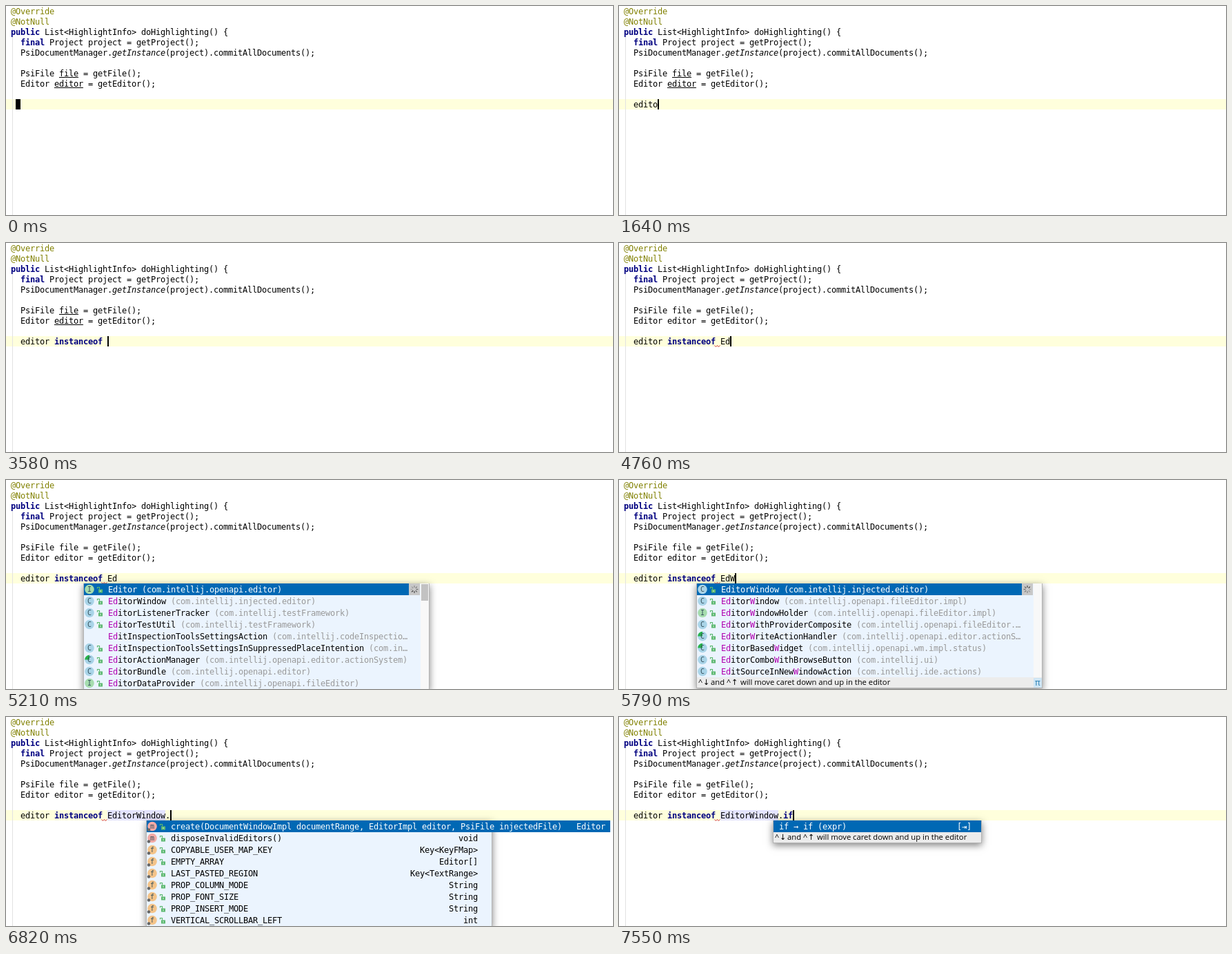
These frames come from a looping animation (880x303 px, 8 s). An HTML page with a canvas:

```html
<!DOCTYPE html>
<html lang="en">
<head>
<meta charset="utf-8">
<title>Code completion</title>
<style>
html, body { margin: 0; width: 880px; height: 303px; overflow: hidden; background: #fff; }
canvas { display: block; }
</style>
</head>
<body>
<canvas id="stage" width="880" height="303"></canvas>
<script>
const ctx = document.getElementById('stage').getContext('2d');
const LOOP = 8000, CELL = 7, LINE = 15, ROW = 17, CARET_Y = 135, POPUP_Y = 150;
const MONO = '"DejaVu Sans Mono", monospace';
const SANS = '"Open Sans", "DejaVu Sans", sans-serif';

const CODE = [
  '@Override',
  '@NotNull',
  'public List<HighlightInfo> doHighlighting() {',
  '  final Project project = getProject();',
  '  PsiDocumentManager.getInstance(project).commitAllDocuments();',
  '',
  '  PsiFile file = getFile();',
  '  Editor editor = getEditor();'
];

// Keystrokes; "<" erases the previous character.
const KEYS = [
  [900, 'e'], [1190, 'd'], [1340, 'i'], [1490, 't'], [1640, 'o'], [1790, 'r'], [2390, ' '],
  [2830, 'i'], [2980, 'n'], [3130, 's'], [3580, 'tanceof '],
  [4470, 'E'], [4760, 'd'], [5790, 'W'], [6230, '<itorWindow'],
  [6530, '.'], [7110, 'i'], [7420, 'f']
];

// Class rows: icon kind, name, package.
const ED_ROWS = [
  ['I', 'Editor', '(com.intellij.openapi.editor)'],
  ['C', 'EditorWindow', '(com.intellij.injected.editor)'],
  ['C', 'EditorListenerTracker', '(com.intellij.testFramework)'],
  ['C', 'EditorTestUtil', '(com.intellij.testFramework)'],
  ['', 'EditInspectionToolsSettingsAction', '(com.intellij.codeInspectio…'],
  ['C', 'EditInspectionToolsSettingsInSuppressedPlaceIntention', '(com.in…'],
  ['A', 'EditorActionManager', '(com.intellij.openapi.editor.actionSystem)'],
  ['C', 'EditorBundle', '(com.intellij.openapi.editor)'],
  ['I', 'EditorDataProvider', '(com.intellij.openapi.fileEditor)']
];
const EDW_ROWS = [
  ['C', 'EditorWindow', '(com.intellij.injected.editor)'],
  ['C', 'EditorWindow', '(com.intellij.openapi.fileEditor.impl)'],
  ['I', 'EditorWindowHolder', '(com.intellij.openapi.fileEditor.impl)'],
  ['C', 'EditorWithProviderComposite', '(com.intellij.openapi.fileEditor.…'],
  ['A', 'EditorWriteActionHandler', '(com.intellij.openapi.editor.actionS…'],
  ['A', 'EditorBasedWidget', '(com.intellij.openapi.wm.impl.status)'],
  ['C', 'EditorComboWithBrowseButton', '(com.intellij.ui)'],
  ['C', 'EditSourceInNewWindowAction', '(com.intellij.ide.actions)']
];
// Member rows: icon kind, name, no package, type.
const MEMBER_ROWS = [
  ['m', 'create(DocumentWindowImpl documentRange, EditorImpl editor, PsiFile injectedFile)', '', 'Editor'],
  ['m', 'disposeInvalidEditors()', '', 'void'],
  ['f', 'COPYABLE_USER_MAP_KEY', '', 'Key<KeyFMap>'],
  ['f', 'EMPTY_ARRAY', '', 'Editor[]'],
  ['f', 'LAST_PASTED_REGION', '', 'Key<TextRange>'],
  ['f', 'PROP_COLUMN_MODE', '', 'String'],
  ['f', 'PROP_FONT_SIZE', '', 'String'],
  ['f', 'PROP_INSERT_MODE', '', 'String'],
  ['f', 'VERTICAL_SCROLLBAR_LEFT', '', 'int']
];
const IF_ROWS = [['', 'if → if (expr)', '', '[⇥]']];
const ICON_COLORS = { C: '#a9d4e8', A: '#a9d4e8', I: '#a5dcae', m: '#f2aaa6', f: '#f4c48a' };

function rect(x, y, w, h, color) {
  ctx.fillStyle = color;
  ctx.fillRect(x, y, w, h);
}

function setFont(font, spacing = 0) {
  ctx.letterSpacing = '0px';
  ctx.font = font;
  ctx.letterSpacing = spacing + 'px';
}

// Monospace text on the seven-pixel grid; returns the x where it ends.
function mono(str, x, y, color = '#000', style = '') {
  setFont(`${style} 12px ${MONO}`);
  ctx.letterSpacing = CELL - ctx.measureText('0').width + 'px';
  ctx.fillStyle = color;
  ctx.fillText(str, x, y);
  return x + str.length * CELL;
}

function stroke(color, width, points) {
  ctx.strokeStyle = color;
  ctx.lineWidth = width;
  ctx.beginPath();
  points.forEach(([x, y]) => ctx.lineTo(x, y));
  ctx.stroke();
}

function codeLine(line, row) {
  let x = CELL;
  for (const part of line.split(/(@\w+|\b(?:public|final|instanceof|if)\b|getInstance)/)) {
    const [color, style] = part[0] === '@' ? ['#808000', '']
      : /^(public|final|instanceof|if)$/.test(part) ? ['#000080', 'bold']
      : ['#000', part === 'getInstance' ? 'italic' : ''];
    x = mono(part, x, row * LINE + 12, color, style);
  }
}

function typedText(t) {
  let text = '';
  for (const [time, keys] of KEYS) {
    if (t < time) break;
    for (const key of keys) text = key === '<' ? text.slice(0, -1) : text + key;
  }
  return text;
}

function icon(kind, x, y) {
  ctx.fillStyle = ICON_COLORS[kind];
  ctx.beginPath();
  ctx.arc(x, y, 6.8, 0, 2 * Math.PI);
  ctx.fill();
  if (kind === 'A') {
    ctx.fillStyle = '#27b34a';
    ctx.beginPath();
    ctx.moveTo(x, y);
    ctx.arc(x, y, 6.8, Math.PI, 1.5 * Math.PI);
    ctx.fill();
  }
  setFont(`10px ${MONO}`);
  ctx.textAlign = 'center';
  ctx.fillStyle = '#35505c';
  ctx.fillText(kind === 'A' ? 'C' : kind, x, y + 3.5);
  ctx.textAlign = 'left';
  if (kind === 'm' || kind === 'f') {
    ctx.fillStyle = '#666';
    ctx.beginPath();
    ctx.arc(x - 5, y + 5, 2.3, 0, 2 * Math.PI);
    ctx.fill();
  }
  // Open padlock
  rect(x + 13, y, 6, 5, '#5cb870');
  rect(x + 15, y + 2, 2, 1, '#e4f5e8');
  stroke('#5cb870', 1.2, [[x + 14.5, y], [x + 14.5, y - 3], [x + 11.5, y - 3], [x + 11.5, y - 1]]);
}

function spinner(x, y, t) {
  rect(x, y, 16, ROW, '#c8c8c8');
  const turn = Math.floor(t / 145);
  for (let i = 0; i < 8; i++) {
    const a = i * Math.PI / 4, dx = Math.cos(a), dy = Math.sin(a);
    const shade = 70 + (turn - i + 80) % 8 * 14;
    stroke(`rgb(${shade},${shade},${shade})`, 1.3,
      [[x + 8 + dx * 2.5, y + 8.5 + dy * 2.5], [x + 8 + dx * 5.5, y + 8.5 + dy * 5.5]]);
  }
}

function hintBar(x, y, w) {
  rect(x, y, w, 15, '#ececec');
  setFont(`11.25px ${SANS}`);
  ctx.fillStyle = '#000';
  const pieces = [['^', 2], ['↓', 9], ['and', 20], ['^', 43], ['↑', 50],
    ['will move caret down and up in the editor', 63]];
  for (const [str, dx] of pieces) ctx.fillText(str, x + dx, y + 11);
}

// Name with the letters that match the typed prefix picked out.
function itemName(name, match, x, y, selected, style) {
  if (selected || !match) return mono(name, x, y, selected ? '#fff' : '#000', style);
  for (const part of name.split(match)) {
    x = mono(part, x, y, match.test(part) ? '#b000b0' : '#000', style);
  }
  return x;
}

function popup(x, w, rows, { match, style, hint, indent = 35, wide = w, typeInset = 20, track } = {}) {
  const h = rows.length * ROW + (hint ? 15 : 0);
  ctx.save();
  ctx.shadowColor = 'rgba(0,0,0,.5)';
  ctx.shadowBlur = 10;
  ctx.shadowOffsetY = 3;
  rect(x - 1, POPUP_Y, w + 2, h + 1, '#b4b4b4');
  ctx.restore();
  rect(x, POPUP_Y, w, h, '#ebf4fe');
  if (track) rect(x + w - 12, POPUP_Y, 12, h, '#f8f8f8');
  rows.forEach(([kind, name, pack, type = ''], i) => {
    const y = POPUP_Y + i * ROW, base = y + 13, selected = i === 0;
    if (selected) rect(x, y, track ? w - 29 : wide, ROW, '#0068b4');
    if (kind) icon(kind, x + 8, y + 8.5);
    const end = itemName(name, match, x + indent, base, selected, style);
    mono(pack, end + CELL, base, selected ? '#fff' : '#999');
    const right = selected && wide > w ? wide - 7 : w - typeInset;
    mono(type, x + right - type.length * CELL, base, selected ? '#fff' : '#000');
  });
  if (hint) hintBar(x, POPUP_Y + rows.length * ROW, w);
}

function completion(t) {
  if (t >= 2830 && t < 3580) {
    const rows = [['', 'editor1'], ['', 'instanceof']].slice(t < 2980 ? 0 : 1);
    popup(63, 301, rows.map(row => [...row, '']), { match: /(^i)/, style: 'bold', hint: true, indent: 8 });
  } else if (t >= 5060 && t < 5790) {
    popup(113, 500, ED_ROWS, { match: /(^Ed)/, track: true });
    spinner(584, POPUP_Y, t);
    rect(602, 151, 10, 24, '#c2c2c2');
  } else if (t >= 5790 && t < 6080) {
    popup(113, 500, EDW_ROWS, { match: /(^Ed|W)/, hint: true, track: true });
    spinner(584, POPUP_Y, t);
    rect(601, 287, 12, 14, '#cfe6f5');
    setFont(`12px ${SANS}`);
    ctx.fillStyle = '#2079b0';
    ctx.fillText('π', 603, 298);
  } else if (t >= 6820 && t < 7110) {
    popup(204, 500, MEMBER_ROWS, { wide: 672 });
  } else if (t >= 7110 && t < 7550) {
    popup(204, 500, IF_ROWS, { hint: true });
  } else if (t >= 7550) {
    popup(224, 301, IF_ROWS, { hint: true, indent: 8, typeInset: 14 });
  }
}

function draw(t) {
  rect(0, 0, 880, 303, '#fff');
  rect(0, CARET_Y, 880, LINE, '#ffffdc');
  rect(9, 45, 1, 258, '#e2e2e2');
  if (t >= 6680) rect(147, CARET_Y, 84, LINE, '#e4e4ff');

  CODE.forEach(codeLine);
  const text = typedText(t);
  codeLine('  ' + text, 9);

  if (t < 3880) rect(77, 103, 28, 1, '#000');
  if (t < 1940 || (t >= 2390 && t < 3880)) rect(70, 118, 42, 1, '#000');
  if (t >= 4020) {
    stroke('#d03030', 1, [0, 1, 2, 3, 4].map(i => [138.5 + 2 * i, i % 2 ? 150.5 : 148.5]));
  }

  if (t < 300) rect(14, CARET_Y, CELL, LINE, '#000');
  else if (t < 5210 || t >= 5500) rect(21 + text.length * CELL, CARET_Y, 2, LINE, '#000');

  completion(t);
}

function tick() {
  draw(performance.now() % LOOP);
  requestAnimationFrame(tick);
}
tick();
</script>
</body>
</html>
```
